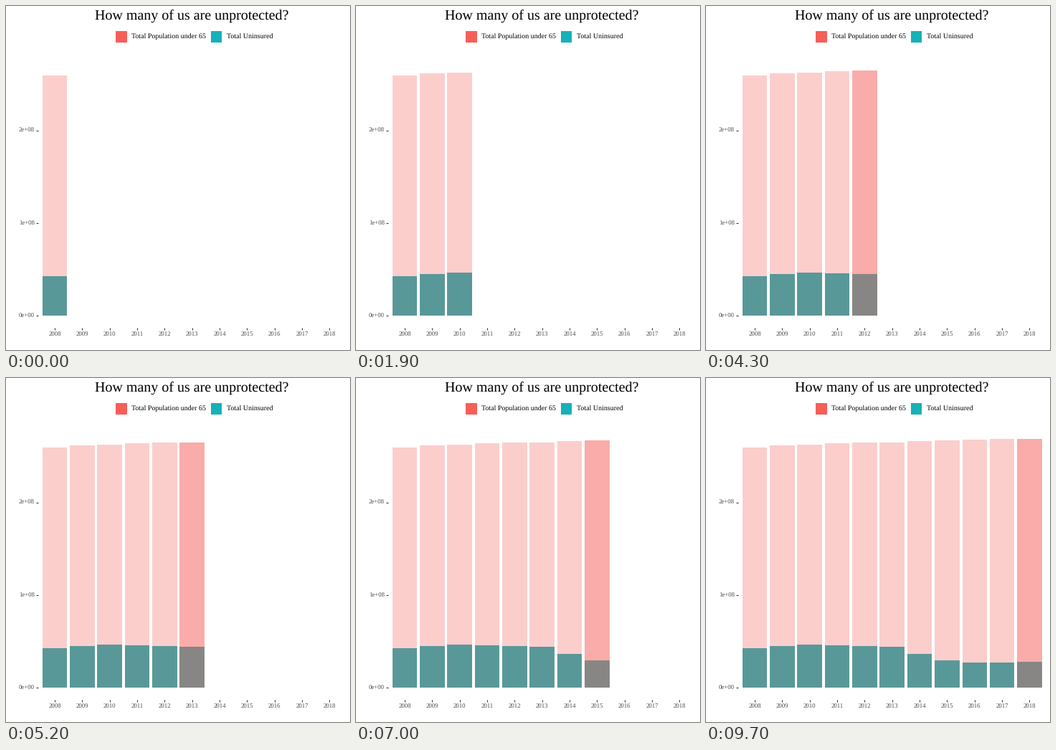
A matplotlib script for the animation above (10000 ms loop, 480 by 480 pixels).

```python
import matplotlib.pyplot as plt
from matplotlib.animation import FuncAnimation
from matplotlib.patches import Rectangle

SIZE, DPI = 480, 80
FRAMES, INTERVAL = 100, 100
PINK, TEAL = "#F55F59", "#17B1B6"
INK, GREY = "#333333", "#4D4D4D"

# Millions of people
YEARS = range(2008, 2019)
TOTAL = [259.2, 261.5, 262.3, 263.8, 264.6, 264.6, 266.2, 266.9, 267.7, 268.5, 268.5]
UNINSURED = [42.6, 44.9, 46.4, 45.6, 44.9, 44.1, 36.4, 29.4, 27.1, 27.1, 27.9]

LEFT, PITCH, WIDTH = 50.72, 38.35, 34.515
BASE, SCALE = 432, 1.2925

plt.rcParams["font.family"] = "Liberation Serif"
plt.rcParams["text.hinting"] = "none"

fig = plt.figure(figsize=(SIZE / DPI, SIZE / DPI), dpi=DPI, facecolor="white")
ax = fig.add_axes([0, 0, 1, 1])
ax.set_xlim(0, SIZE)
ax.set_ylim(SIZE, 0)
ax.axis("off")


def px(n):
    return n * 72 / DPI


def label(x, y, text, size, color="black", ha="left"):
    ax.text(x, y, text, fontsize=px(size), color=color, ha=ha, va="baseline")


def box(x0, y0, x1, y1, color, alpha=1):
    patch = Rectangle((x0, y0), x1 - x0, y1 - y0, facecolor=color,
                      alpha=alpha, linewidth=0)
    return ax.add_patch(patch)


def bar(i, value, color, alpha=1):
    x = LEFT + i * PITCH
    return box(round(x), round(BASE - value * SCALE), round(x + WIDTH), BASE,
               color, alpha)


label(259.5, 19, "How many of us are unprotected?", 20, ha="center")
box(153, 35, 169, 51, PINK)
label(174.6, 46, "Total Population under 65", 10)
box(286, 35, 301, 51, TEAL)
label(307.6, 46, "Total Uninsured", 10)

for k in range(3):
    y = BASE - 100 * k * SCALE
    ax.hlines(y, 42.2, 45, color=INK, linewidth=px(1.07))
    label(40, round(y + 3), f"{k}e+{'08' if k else '00'}", 8.8, GREY, "right")

for i, year in enumerate(YEARS):
    x = LEFT + i * PITCH + WIDTH / 2
    ax.vlines(x, 449.2, 452, color=INK, linewidth=px(1.07))
    label(x, 461, str(year), 8.8, GREY, "center")

bars = [(bar(i, UNINSURED[i], TEAL), bar(i, TOTAL[i], PINK, 0.3))
        for i in range(len(YEARS))]
glows = [bar(i, total, PINK, 0.3) for i, total in enumerate(TOTAL)]

starts = [9 * i + (i >= 2) for i in range(len(YEARS))]
ends = starts[1:] + [FRAMES]


def draw(frame):
    for i, (start, end) in enumerate(zip(starts, ends)):
        for part in bars[i]:
            part.set_visible(frame >= start)
        # Each bar is tinted twice just before the next one appears
        glows[i].set_visible(start + (6 if i else 5) <= frame < end)
    return [*sum(bars, ()), *glows]


anim = FuncAnimation(fig, draw, frames=FRAMES, interval=INTERVAL,
                     repeat=True, repeat_delay=0, blit=False)
plt.show()
```
